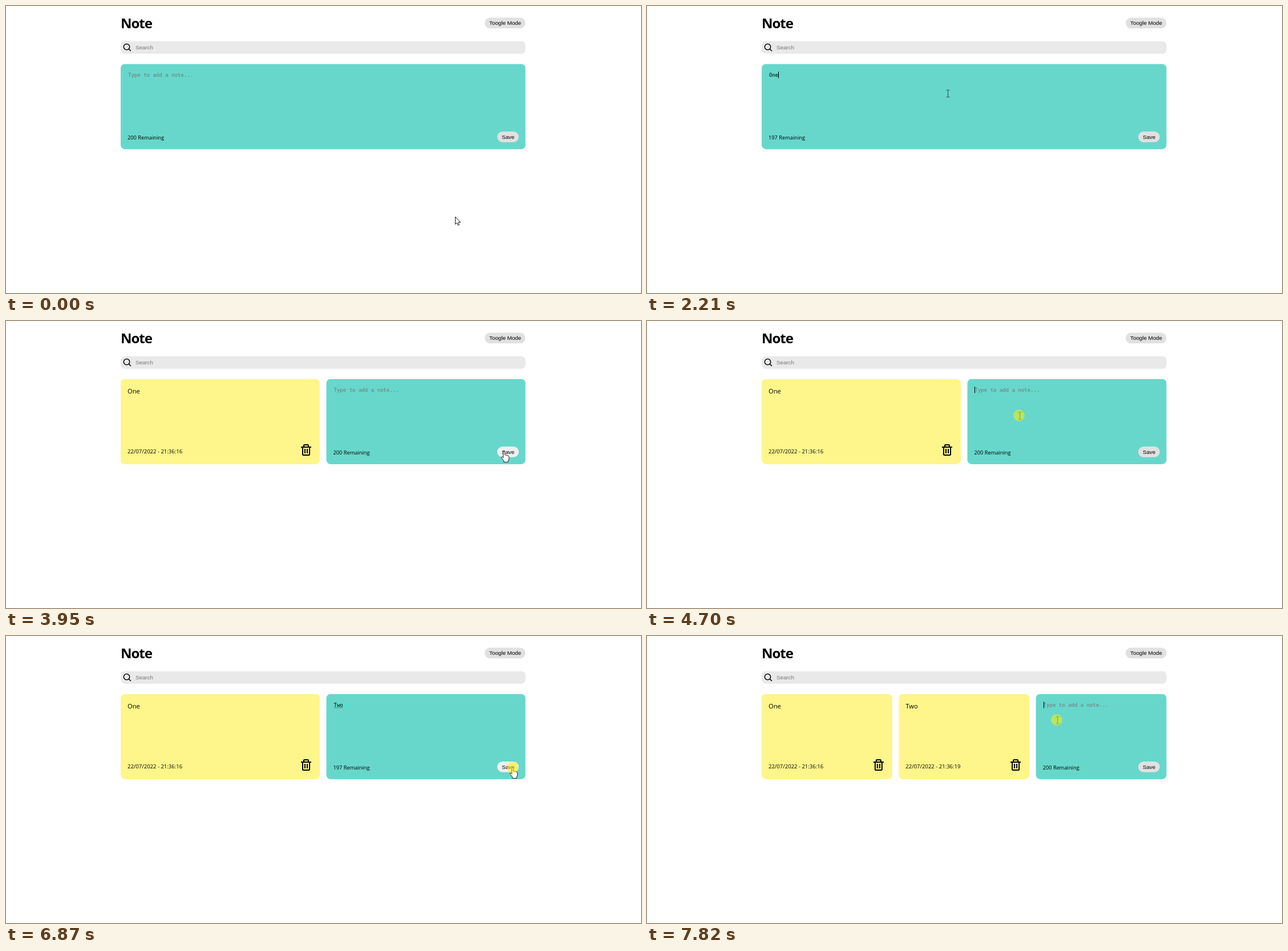
Write an HTML page that moves like this. It is 1113 px wide and 503 px high and loops after 8 s.

```html
<!DOCTYPE html>
<html lang="en">
<head>
<meta charset="utf-8">
<title>Note</title>
<style>
  html, body { margin: 0; width: 100%; height: 100%; overflow: hidden; background: #fff; }
  svg { display: block; width: 1113px; height: 503px; }
  text { font: 9.25px "Open Sans", "Noto Sans", sans-serif; fill: #000; white-space: pre; }
  .title { font-size: 24px; font-weight: 700; letter-spacing: -1px; }
  .body { font-size: 11.2px; }
  .date { font-size: 9.5px; }
  .ui { font: 9.75px "Liberation Sans", Arial, sans-serif; }
  .mid { text-anchor: middle; }
  .mono { font: 9.02px "DejaVu Sans Mono", "Noto Sans Mono", monospace; }
  .hint { fill: #757575; }
</style>
</head>
<body>
<svg viewBox="0 0 1113 503">
  <defs>
    <path id="bin" fill-rule="evenodd" d="M5 20a2 2 0 0 0 2 2h10a2 2 0 0 0 2-2V8h2V6h-4V4a2 2 0 0 0-2-2H9a2 2 0 0 0-2 2v2H3v2h2zM9 4h6v2H9zM7 8h10v12H7zM9 10h2v8H9zM13 10h2v8h-2z"/>
  </defs>
  <text class="title" x="201" y="39">Note</text>
  <rect x="839" y="20.5" width="71.5" height="18.7" rx="9.35" fill="#e1e1e1"/>
  <text class="ui mid" x="875" y="33">Toogle Mode</text>
  <rect x="201" y="61.7" width="709.5" height="22" rx="7.4" fill="#e9e9e9"/>
  <g fill="none" stroke="#000" stroke-width="1.5">
    <circle cx="211.5" cy="71.6" r="5.2"/>
    <path d="M215.2 75.3l3.6 3.6"/>
  </g>
  <text class="ui hint" x="227" y="76">Search</text>

  <g id="notes"></g>

  <g id="editor">
    <rect id="panel" y="101.7" height="149.3" rx="7.4" fill="#67d7cc"/>
    <text id="draft" class="mono" x="13" y="124"></text>
    <path id="squiggle" fill="none" stroke="#b02a3c" stroke-dasharray="1.4 .6" d="M13 125.7h16.3"/>
    <path id="caret" stroke="#000" d="M0 115v11.5"/>
    <text id="left" x="12" y="234"></text>
  </g>
  <rect id="save" x="861" y="220" width="37.8" height="18.8" rx="9.4"/>
  <text class="ui mid" x="880" y="233">Save</text>

  <g id="pointer">
    <path id="arrow" fill="#fff" stroke="#14142a" d="M.5.5V13.6L3.5 10.9 5.4 15.4 7.5 14.5 5.6 10.1H9.6Z"/>
    <path id="beam" fill="none" stroke="#1c3836" stroke-width=".9" d="M-3-6.2h2.4L0-5.7l.6-.5H3M0-5.7V5.7M-3 6.2h2.4L0 5.7l.6.5H3"/>
    <path id="hand" fill="#fff" stroke="#222" stroke-linejoin="round" d="M-1.5 1Q-1.5-.6-.1-.6T1.3 1V6Q2.5 5 3.6 6.4 5 5.6 6 7 8.6 6.6 8.6 9.4V13L7.2 16V18.3H-.4V16.2L-4.3 11.2Q-5.3 9.4-4 9-2.9 8.8-1.5 10.6Z"/>
  </g>
  <circle id="click" r="10" fill="#fff200" fill-opacity=".52"/>
</svg>
<script>
const LOOP = 8000, STEP = 69, CLICK = 200, BLINK = 530;
const LEFT = 201, WIDE = 709.5, GAP = 11.5, CHAR = 5.43;
const $ = id => document.getElementById(id);
const set = (el, attrs) => { for (const k in attrs) el.setAttribute(k, attrs[k]); };
const show = (el, on) => set(el, { visibility: on ? 'visible' : 'hidden' });

// One round per note: click the field, type, click Save. The last round is cut short.
const rounds = [
  { word: 'One', focus: 1000, keys: [1790, 2140, 2210], save: 3750, date: '22/07/2022 - 21:36:16' },
  { word: 'Two', focus: 4700, keys: [5120, 5380, 5450], save: 6870, date: '22/07/2022 - 21:36:19' },
  { word: '', focus: 7820, keys: [], save: Infinity }
];

// Each pointer move is a cubic curve from where the last one ended.
const home = [787, 369];
const moves = [
  { from: 70, to: 620, curve: [[740, 350], [552, 147], [612, 219]] },
  { from: 1130, to: 1330, curve: [[580, 175], [560, 165], [527.5, 153.5]] },
  { from: 2810, to: 3490, curve: [[640, 150], [830, 232], [873, 229]] },
  { from: 4100, to: 4500, curve: [[480, 290], [360, 215], [653.5, 166]] },
  { from: 6050, to: 6670, curve: [[720, 165], [990, 230], [888, 231]] },
  { from: 7270, to: 7620, curve: [[560, 235], [560, 165], [719.5, 147.5]] }
];

function pointerAt(t) {
  let p = home;
  for (const { from, to, curve: [a, b, c] } of moves) {
    if (t < from) break;
    const steps = Math.round((to - from) / STEP) + 1;
    const u = Math.min(1, (Math.floor((t - from) / (to - from) * (steps - 1) + 1e-6) + 1) / steps);
    const v = 1 - u;
    p = p.map((s, k) => v ** 3 * s + 3 * v * v * u * a[k] + 3 * v * u * u * b[k] + u ** 3 * c[k]);
  }
  return p;
}

// Solid while typing, then off for one blink, then on until the field loses focus.
function caretOn(t, { focus, keys, save }) {
  const idle = t - (keys.length ? keys[keys.length - 1] : focus);
  return t >= focus && t < save && (idle < BLINK || idle >= 2 * BLINK - 30);
}

for (const r of rounds.filter(r => r.date)) {
  r.el = document.createElementNS('http://www.w3.org/2000/svg', 'g');
  r.el.innerHTML = `<rect y="101.7" height="149.3" rx="7.4" fill="#fef58b"/>
    <text class="body" x="12" y="126.5">${r.word}</text>
    <text class="date" x="12" y="231.5">${r.date}</text>
    <use href="#bin"/>`;
  $('notes').append(r.el);
}

function draw(t) {
  const done = rounds.filter(r => t >= r.save + CLICK).length;
  const width = (WIDE - GAP * done) / (done + 1);
  const cardX = i => LEFT + i * (width + GAP);

  rounds.forEach(({ el }, i) => {
    if (!el) return;
    show(el, i < done);
    set(el, { transform: `translate(${cardX(i)})` });
    set(el.querySelector('rect'), { width });
    set(el.querySelector('use'), { transform: `translate(${width - 36} 214)` });
  });

  const round = rounds[done], x0 = cardX(done);
  const typed = round.keys.filter(k => t >= k).length;
  set($('editor'), { transform: `translate(${x0})` });
  set($('panel'), { width });
  $('draft').textContent = typed ? round.word.slice(0, typed) : 'Type to add a note...';
  $('draft').classList.toggle('hint', !typed);
  $('left').textContent = `${200 - typed} Remaining`;
  show($('squiggle'), typed && t >= round.keys[typed - 1] + 600);
  set($('caret'), { transform: `translate(${Math.floor(x0 + 13.4 + typed * CHAR) + .5 - x0})` });
  show($('caret'), caretOn(t, round));

  const [x, y] = pointerAt(t);
  const onSave = x > 861 && x < 899 && y > 220 && y < 239;
  const onText = x > x0 + 12 && x < x0 + width - 12 && y > 114 && y < 219.5;
  set($('save'), { fill: onSave ? '#efefef' : '#e1e1e1' });
  set($('pointer'), { transform: `translate(${x} ${y})` });
  show($('hand'), onSave);
  show($('beam'), onText);
  show($('arrow'), !onSave && !onText);
  set($('click'), onText ? { cx: x - 1.5, cy: y - .5 } : { cx: x, cy: y - .5 });
  show($('click'), [round.focus, round.save].some(c => t >= c && t < c + CLICK));
}

const start = performance.now();
function tick() {
  draw((performance.now() - start) % LOOP);
  requestAnimationFrame(tick);
}
draw(0);
requestAnimationFrame(tick);
</script>
</body>
</html>
```
